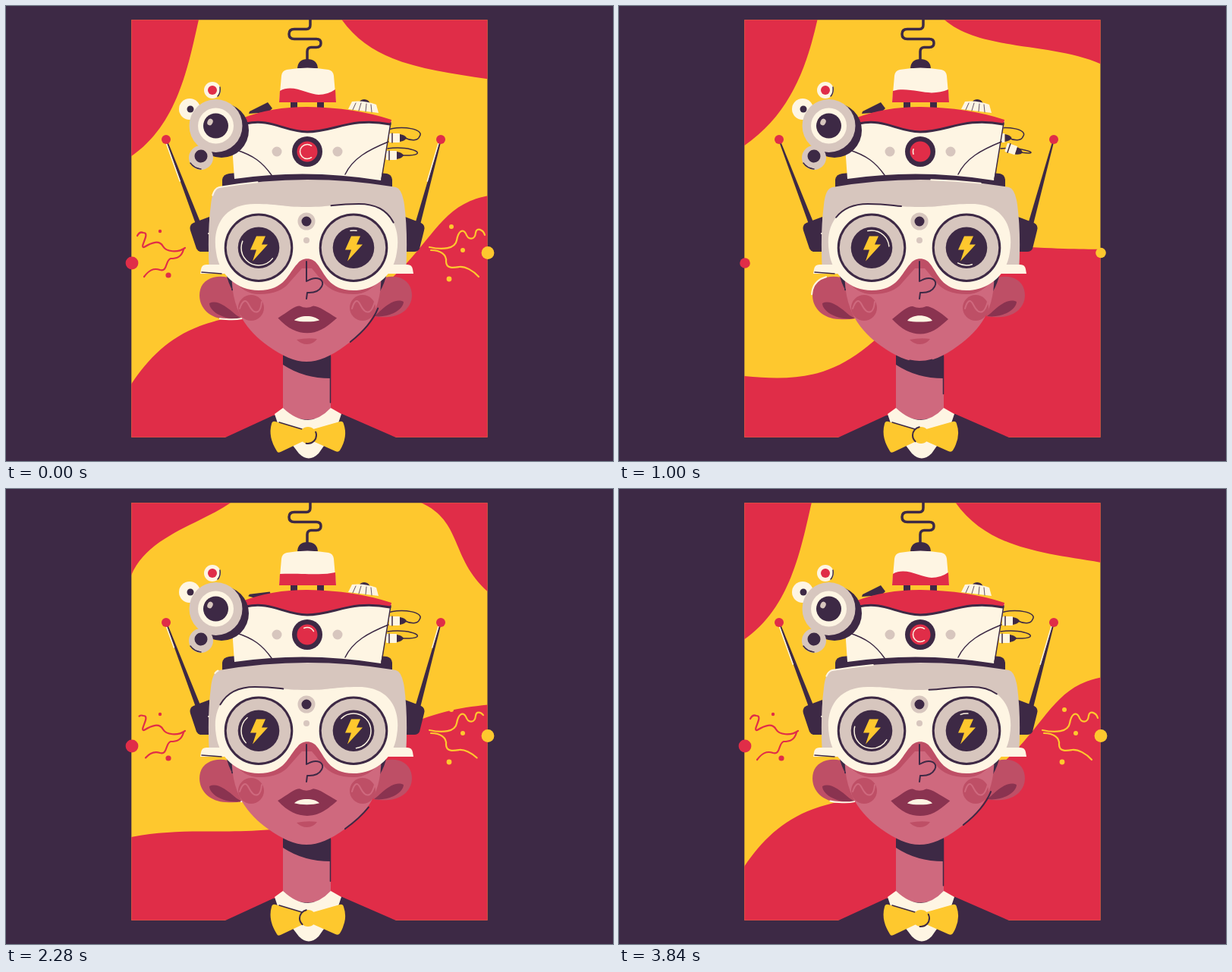
An HTML page for the animation above (3880 ms loop, 800 px wide and 600 px high).

```html
<!DOCTYPE html>
<html lang="en">
<head>
<meta charset="utf-8">
<title>Inventor portrait</title>
<style>
html, body { margin: 0; width: 100%; height: 100%; overflow: hidden; background: #3d2945; }
svg { display: block; width: 800px; height: 600px; }
.d { fill: #3d2945; } .y { fill: #fec82e; } .r { fill: #e02d48; } .c { fill: #fef5e3; }
.g { fill: #d7c6be; } .s { fill: #cf697e; } .m { fill: #be4f66; } .k { fill: #8a3350; }
.ln { fill: none; stroke: #3d2945; stroke-width: 2; stroke-linecap: round; stroke-linejoin: round; }
.w { stroke: #fef5e3; } .thin { stroke-width: 1.5; } .thick { stroke-width: 3.5; }
</style>
</head>
<body>
<svg viewBox="0 0 800 600">
  <defs>
    <clipPath id="poster"><rect x="165.3" y="18.3" width="469.2" height="550.4"/></clipPath>
    <path id="bolt" class="y" d="M-3 -16H9L4 -5H12L-8 17L-3 2H-11Z"/>
    <g id="plug">
      <rect class="c" x="-7" y="-6" width="14" height="12" rx="1"/>
      <path class="d" d="M7 -5Q14 -4 16 0Q14 4 7 5Z"/>
      <path class="ln thin" d="M-3 -6V6"/>
    </g>
  </defs>
  <rect class="d" width="800" height="600"/>
  <g clip-path="url(#poster)">
    <rect class="y" x="165" y="18" width="470" height="551"/>
    <path id="topLeft" class="r"/><path id="topRight" class="r"/><path id="low" class="r"/>
  </g>
  <path class="d" d="M289 569L352 540L398 534L443 538L514 569V600H289Z"/>

  <!-- sparks and antennas -->
  <circle id="ballL" class="r" cx="166" cy="339"/><circle id="ballR" class="y" cx="635" cy="325.5"/>
  <g id="sparks"></g>
  <g id="antennas"></g>
  <path class="d" d="M268 278L247 286Q241 289 243 296L251 320Q253 324 258 324H268Z"/>
  <path class="d" d="M526 278L547 286Q553 289 551 296L545 320Q543 324 538 324H526Z"/>

  <!-- neck and collar -->
  <path class="s" d="M365 440H428V535Q398 556 365 535Z"/>
  <path class="d" d="M365 455H428V491Q392 491 365 473Z"/>
  <path id="neckLine" class="ln thin"/>
  <path class="c" d="M365 530Q382 546 398 546Q414 545 428 530L442 538L436 556L412 590Q399 603 386 590L360 556L354 538Z"/>
  <path class="y" d="M398 560L355 548Q351 547 350 551Q345 568 357 587Q358 590 362 588L398 571L434 587Q438 589 440 586Q451 568 445 551Q444 547 440 548Z"/>
  <path class="ln thin" d="M360 549L390 558"/>
  <circle class="y" cx="398" cy="566" r="11"/>
  <path id="knot" class="ln" pathLength="1" d="M398 555A11 11 0 0 1 398 577A11 11 0 0 1 398 555"/>

  <!-- ears and face -->
  <path class="m" d="M300 361C285 353 261 356 256 374C251 394 266 412 290 413Q302 414 311 412Z"/>
  <path class="k" d="M311 412C288 415 268 403 268 392C278 387 290 396 304 408Z"/>
  <path class="m" d="M492 361C507 353 529 356 534 374C539 394 524 409 504 410Q494 411 484 409Z"/>
  <path class="k" d="M485 409C505 412 524 400 524 390C514 385 503 393 490 405Z"/>
  <path id="ear" class="ln w" pathLength="1" d="M298 360C284 352 260 356 255 374C250 394 265 413 290 413Q302 414 311 412"/>
  <path class="d" d="M290 352H306L299 376Q293 366 290 352ZM502 352H486L493 376Q499 366 502 352Z"/>
  <path class="s" d="M298 345C294 402 320 430 345 448C365 462 380 469 396 469C412 469 428 462 447 448C474 428 498 402 494 345Z"/>
  <path class="m" d="M298 358Q312 380 334 380Q362 380 374 364L390 346H403L418 364Q430 380 458 380Q480 380 494 358V328H298Z"/>
  <path id="jaw" class="ln" pathLength="1" d="M298 374C298 406 322 432 345 448C365 462 380 469 396 469C412 469 428 462 447 448C472 430 495 406 495 374"/>
  <circle class="m" cx="323" cy="398" r="17"/><circle class="m" cx="470" cy="398" r="17"/>
  <path class="ln" style="stroke:#cf697e" d="M308 399Q314 382 320 394T332 403Q336 401 337 390M456 399Q461 382 467 394T479 403Q483 401 486 390"/>
  <path id="lips" class="k"/><path id="teeth" class="c"/>
  <path class="m" d="M383 440Q397 437 410 439Q405 446 397 446Q389 446 383 440Z"/>

  <!-- lamp -->
  <path class="ln thick" d="M401 18V25Q401 30.5 396 30.5H380Q373 30.5 373 37Q373 43.5 380 43.5H409Q415 43.5 415 49Q415 54.5 409 54.5H402Q397 55 397 60V72"/>
  <path class="d" d="M384 82Q385 70 397 70Q410 70 411 82ZM375 125H384V135H375ZM410 125H419V135H410Z"/>
  <path class="c" d="M360 127L363 92Q364 85 370 84Q397 79 425 84Q431 85 432 92L435 127Z"/>
  <path id="lampWave" class="r"/>

  <!-- hat -->
  <path id="wireA" class="ln thin" d="M503 163C525 157 552 163 545 172C543 178 534 178 526 174"/><path id="wireB" class="ln thin"/>
  <use id="plugA" href="#plug"/><use id="plugB" href="#plug"/>
  <path id="lever" class="d" d="M321 139L345 127L351 135L346 140L320 142Z"/>
  <path class="d" d="M465 129Q466 123 472 123Q478 123 480 129Z"/>
  <path class="c" d="M451 136L456 126Q472 124 488 130L491 141Z"/>
  <path class="ln" style="stroke-width:.8" d="M461 128L457 137M468 128L465 138M475 129L474 139M481 130L482 140"/>
  <path class="d" d="M285 239V229Q286 222 294 221Q397 209 502 221Q508 222 509 229V239Z"/>
  <path class="c" d="M310 152L298 185L301 228Q397 214 494 230L508 152Q397 140 310 152Z"/>
  <path class="r" d="M311 148Q350 133 397 133Q460 134 508 150L507 156C455 146 432 166 397 166C365 165 350 148 316 155Z"/>
  <path class="ln" style="stroke-width:3" d="M316 155C350 148 365 165 397 166C432 166 455 146 506 156"/>
  <path class="ln thin" d="M507 154L495 228M304 190C326 197 338 206 350 223M504 179C477 190 457 201 447 222"/>
  <circle class="g" cx="357" cy="192" r="6.5"/><circle class="g" cx="437" cy="192" r="6.5"/>
  <circle class="d" cx="397" cy="192" r="20"/><circle class="r" cx="397" cy="192" r="13.5"/>
  <circle id="flush" cx="397" cy="192" r="13.5" fill="#d6586a"/>
  <path id="buttonArc" class="ln w thin" pathLength="1" d="M397 182.5A9.5 9.5 0 0 1 397 201.5A9.5 9.5 0 0 1 397 182.5"/>

  <!-- camera -->
  <circle class="d" cx="284" cy="164" r="36"/>
  <g id="orbit">
    <circle class="g" cx="257" cy="200" r="16"/><circle class="d" cx="257" cy="198" r="8.5"/>
    <circle class="c" cx="242" cy="136" r="14"/><circle class="d" cx="243" cy="136" r="4.5"/>
    <circle class="c" cx="272" cy="111" r="11"/><circle class="r" cx="272" cy="111" r="6"/>
    <path class="ln thin" d="M279 119Q283 115 282 107M243 207Q248 214 257 215"/>
  </g>
  <circle class="g" cx="276.5" cy="158" r="35"/><circle class="c" cx="276.5" cy="158" r="23.5"/>
  <circle class="d" cx="276.5" cy="158" r="16.5"/><ellipse class="g" cx="269" cy="153" rx="3.5" ry="4.5" transform="rotate(25 269 153)"/>

  <!-- helmet and goggles -->
  <path class="g" d="M268 352Q265 300 270 262Q272 241 281 239Q397 219 514 239Q522 241 525 262Q530 300 527 352H490V320H305V352Z"/>
  <path id="helmet" class="ln w" pathLength="1" d="M267 300Q268 278 270 262Q272 241 281 239Q397 219 514 239Q522 241 525 262Q529 280 528 300"/>
  <path class="c" d="M257 347Q258 341 264 341H290V353H256ZM536 347Q535 341 529 341H503V353H537Z"/>
  <path class="ln thin" d="M258 351L284 353"/>
  <g id="goggles"></g>
  <circle class="g" cx="396" cy="284" r="11.5"/><circle class="d" cx="396" cy="284" r="6.5"/>
  <circle class="g" cx="396" cy="309" r="4"/>
  <path class="ln" d="M396 337V363C411 354 421 362 416 370Q411 379 397 378L396 386"/>
</svg>
<script>
const LOOP = 3880, NS = 'http://www.w3.org/2000/svg', TAU = Math.PI * 2;
const $ = id => document.getElementById(id);
const set = (el, o) => { for (const k in o) el.setAttribute(k, o[k]); return el; };
const add = (parent, tag, o) => set($(parent).appendChild(document.createElementNS(NS, tag)), o);
const clamp = x => Math.max(0, Math.min(1, x));
const wrap = (t, span = LOOP) => ((t % span) + span) % span;
const ease = x => { x = clamp(x); return x * x * (3 - 2 * x); };
const ramp = (t, a, b) => ease((t - a) / (b - a));
// rises over a..b, falls over c..d
const pulse = (t, a, b, c, d) => ramp(t, a, b) * (1 - ramp(t, c, d));
// smooth bump of half-width w around c, looping
const near = (t, c, w) => {
  const d = Math.abs(wrap(t - c + LOOP / 2) - LOOP / 2);
  return d < w ? Math.cos(d / w * TAU / 4) ** 2 : 0;
};
// eases through a few looping stops: time, value, time, value...
function glide(t, ...p) {
  const n = p.length;
  let i = n - 2;
  while (i > 0 && t < p[i]) i -= 2;
  const from = t < p[0] ? n - 2 : i, to = (from + 2) % n;
  const k = ease(wrap(t - p[from]) / wrap(p[to] - p[from]));
  return p[from + 1] + (p[to + 1] - p[from + 1]) * k;
}

// Show only the part a..b of an open path.
function trim(el, a, b) {
  a = clamp(a); b = clamp(b);
  set(el, { 'stroke-dasharray': `0 ${a} ${Math.max(0, b - a)} 3`, visibility: b - a > .004 ? 'visible' : 'hidden' });
}
// Show a dash of given length centred at mid on a closed path.
function dash(el, mid, len) {
  len = clamp(len);
  set(el, { 'stroke-dasharray': `${len} ${1 - len}`, 'stroke-dashoffset': len / 2 - mid, visibility: len > .01 ? 'visible' : 'hidden' });
}

function blobs(t) {
  const lx = glide(t, 0, 254, 600, 252, 2050, 303, 3200, 238), ly = glide(t, 600, 196, 2280, 114, 3400, 200);
  const q = pulse(t, 1400, 2300, 3000, LOOP);
  set($('topLeft'), { d: `M165 18H${lx}C${lx - 14 - 28 * q} ${80 - 33 * q} ${226 - 40 * q} ${ly - 42 - 10 * q} 165 ${ly}Z` });

  const rx = glide(t, 120, 441, 1400, 425, 2280, 547), ry = glide(t, 70, 96, 1400, 71, 2550, 146);
  const sag = 1 - pulse(t, 600, 1400, 2280, 2880);
  set($('topRight'), { d: `M635 18H${rx}C${rx + 55 - 13 * sag} ${43 + 34 * sag} ${585 - 30 * sag} ${ry - 45 + 32 * sag} 635 ${ry}Z` });

  const y0 = glide(t, 150, 500, 2600, 457), y1 = glide(t, 0, 440, 600, 502, 3100, 426);
  const y2 = glide(t, 0, 405, 700, 486, 1500, 482, 3400, 414), y3 = glide(t, 600, 395, 2200, 447);
  const x1 = 205 + 50 * pulse(t, 0, 600, 1900, 2900);
  const sy = glide(t, 700, 323, 3800, 248), ey = glide(t, 0, 382, 600, 326, 1400, 301, 3500, 384);
  const drop = ey - sy, sx = 565 + 40 * pulse(t, 0, 600, 1400, 3400);
  set($('low'), { d: `M165 569V${y0}C${x1} ${y1} ${x1 + 45} ${y2} 375 ${y3}L480 ${ey}C562 ${sy + drop * Math.abs(drop) / 240} ${sx} ${sy + drop / 10} 635 ${sy}V569Z` });
}

const RED = '#e02d48', YEL = '#fec82e';
const streak = (d, stroke, w = 2.2) => add('sparks', 'path', { d, stroke, pathLength: 1, fill: 'none', 'stroke-width': w, 'stroke-linecap': 'round' });
const dot = (cx, cy, r, fill) => ({ r, el: add('sparks', 'circle', { cx, cy, fill }) });
const squiggles = [
  streak('M236 319C226 326 211 324 207 317C202 308 192 312 182 318C175 319 191 299 181 299Q176 297 173 303', RED),
  streak('M234 321C231 332 224 333 217 333C210 335 213 351 203 348C194 345 188 349 182 357', RED),
  streak('M558 318C576 322 592 320 594 309C596 297 602 293 606 300C609 309 618 309 619 299C620 291 629 295 631 302', YEL),
  streak('M560 322C573 322 581 328 580 337C580 347 591 345 597 344C605 343 616 349 623 357', YEL)];
const arcs = [streak('M232 310Q221 309 215 301', RED), streak('M240 323Q234 332 237 343', RED),
  streak('M572 301Q575 295 579 289', YEL), streak('M556 327Q564 340 562 357', YEL)];
const seeds = [dot(236, 307, 2.4, RED), dot(556, 307, 2.6, YEL)];
const early = [dot(239, 325, 2, RED), dot(579, 318, 2.2, YEL)];
const late = [dot(214, 355, 3.6, RED), dot(602, 322, 3, YEL), dot(584, 360, 3.4, YEL)];
const both = [dot(203, 297, 2.2, RED), dot(587, 291, 3, YEL)];
const scale = (list, k) => list.forEach(o => set(o.el, { r: o.r * k }));

function sparks(t) {
  // two bursts per loop; the second runs on past the loop point
  const q = t < 1340 ? t + 1020 : t < 2850 ? t - 1380 : t - 2860;
  squiggles.forEach(p => trim(p, ramp(q, 1060, 1420), ramp(q, 480, 960)));
  arcs.forEach(p => trim(p, ramp(q, 400, 640), ramp(q, 120, 400)));
  scale(seeds, pulse(q, -40, 30, 60, 180));
  scale(early, pulse(q, 200, 380, 430, 620));
  scale(late, pulse(q, 480, 800, 1200, 1530));
  scale(both, pulse(q, 220, 460, 1150, 1480));
  const r = 6.8 + 1.6 * pulse(q, 700, 860, 1080, 1300);
  set($('ballL'), { r }); set($('ballR'), { r });
}

const rods = [-1, 1].map(side => ({
  side, body: add('antennas', 'path', { class: 'd' }),
  shine: add('antennas', 'path', { class: 'ln w thin', pathLength: 1 }),
  tip: add('antennas', 'circle', { class: 'r', r: 6 })
}));
function antennas(t) {
  const k = near(t, 1490, 200) + near(t, 2880, 200);
  const lit = glide(t, 0, .5, 600, 0, 1900, 0, 2880, .9);
  for (const { side, body, shine, tip } of rods) {
    const x = 398 + side * 145, px = 392 + side * (181 + 11 * k), py = 176 + 4.5 * k;
    set(body, { d: `M${x - 3.5} 286H${x + 3.5}L${px + 1} ${py}H${px - 1}Z` });
    set(shine, { d: `M${px - 1.5} ${py}L${x - 4} 286` });
    trim(shine, .05, lit);
    set(tip, { cx: px, cy: py });
  }
}

const frame = 'M396 265C430 265 430 261 465 261C505 261 521 290 515 325C511 355 487 375 458 375C425 375 420 352 410 340C404 331 390 331 384 340C372 352 368 375 333 375C305 375 281 355 277 325C271 290 288 261 328 261C362 261 362 265 396 265Z';
add('goggles', 'path', { class: 'c', d: frame });
const rim = add('goggles', 'path', { class: 'ln', pathLength: 1, d: frame });
const lenses = [333, 458].map(x => {
  const ring = (r, cls) => add('goggles', 'circle', { cx: x, cy: 318.7, r, class: cls });
  ring(45.3, 'd'); ring(42.3, 'g'); ring(27.3, 'd');
  add('goggles', 'use', { href: '#bolt', x, y: 319.5 });
  return add('goggles', 'path', { class: 'ln w thin', pathLength: 1, d: `M${x} 296A23 23 0 0 1 ${x} 342A23 23 0 0 1 ${x} 296` });
});

function glints(t) {
  const u = t / LOOP;
  dash(lenses[0], 210 / 360 + 2 * u, .24 + .22 * Math.cos(3 * TAU * u));
  dash(lenses[1], 2 * u, .3 - .3 * Math.cos(TAU * (u - .1)));
  dash(rim, .12 + 3 * u, .14 * (1 - pulse(t, 350, 500, 700, 1000)));
  dash($('knot'), (285 + 145 * near(t, 2880, 400) + 205 * near(t, 0, 400)) / 360, .35);
  const off = pulse(t, 150, 500, 900, 1300), dim = pulse(t, 1500, 2200, 2900, 3250);
  dash($('buttonArc'), .75 + .3 * dim, .7 - .7 * off - .45 * dim);
  set($('flush'), { opacity: near(t, 600, 330) });

  const j = wrap(t - 400), a = .72 * (1 - Math.exp(-j / 600)) + .3 * ramp(j, 3500, LOOP);
  trim($('jaw'), a, a + .08 + .13 * j / LOOP);
  const h = wrap(t - 450, LOOP / 2), mid = 1.2 - 1.15 * (1 - Math.exp(-h / 800));
  const half = .09 * (1 - ramp(h, 1500, 1900));
  trim($('helmet'), mid - half, mid + half);
  const e = wrap(t - 500, LOOP / 2) / 1600;
  trim($('ear'), e - .12, e + .12);
  set($('neckLine'), { d: `M427.5 462V${glide(t, 0, 523, 600, 511)}` });
}

function hat(t) {
  const k = pulse(t, 200, 480, 760, 1100), mix = (a, b) => a + (b - a) * k;
  const x = mix(508, 550), y = mix(197, 156), ang = k * TAU / 4;
  const ex = x + 15 * Math.cos(ang), ey = y + 15 * Math.sin(ang);
  set($('plugB'), { transform: `translate(${x} ${y}) rotate(${90 * k})` });
  set($('wireB'), { d: `M503 188C${mix(535, 520)} ${mix(183, 194)} ${mix(562, 550)} ${mix(198, 192)} ${ex} ${ey}` });
  set($('plugA'), { transform: `translate(${512 - 50 * k} 174)` });
  set($('wireA'), { transform: `translate(${-60 * k} 0)` });
  set($('lever'), { transform: `rotate(${20 * near(t, 2280, 400)} 322 139)` });
  set($('orbit'), { transform: `rotate(${20 * near(t, 1700, 550) - 30 * near(t, 3130, 700)} 276.5 158)` });
  const a = 5 * near(t, 0, LOOP / 2);
  set($('lampWave'), { d: `M361 112C378 ${112 - 2 * a} 398 ${112 + a} 412 ${112 + a}Q424 ${112 + a} 434 110L435 127H360Z` });
}

function mouth(t) {
  const m = glide(t, 600, 0, 1400, 0, 2900, 1, 3300, 1);
  const l = 360 - 3 * m, r = 434 + 4 * m, y = 413 - 3 * m, b = 432.5 - 2.5 * m, top = 396 - m;
  set($('lips'), { d: `M${l} ${y}C372 403 380 ${top} 387 ${top}Q396 400 405 ${top}C412 ${top} 424 404 ${r} ${y}C420 426 410 ${b} 397 ${b}C384 ${b} 372 426 ${l} ${y}Z` });
  set($('teeth'), { d: `M380 ${415 - m}C386 ${406 + 2 * m} 407 ${406 + 2 * m} 413 ${415 - m}C405 417 388 417 380 ${415 - m}Z` });
}

function draw(now) {
  const t = wrap(now);
  for (const part of [blobs, sparks, antennas, glints, hat, mouth]) part(t);
}
let start = null;
function tick(now) {
  if (start === null) start = now;
  draw(now - start);
  requestAnimationFrame(tick);
}
draw(0);
requestAnimationFrame(tick);
</script>
</body>
</html>
```
